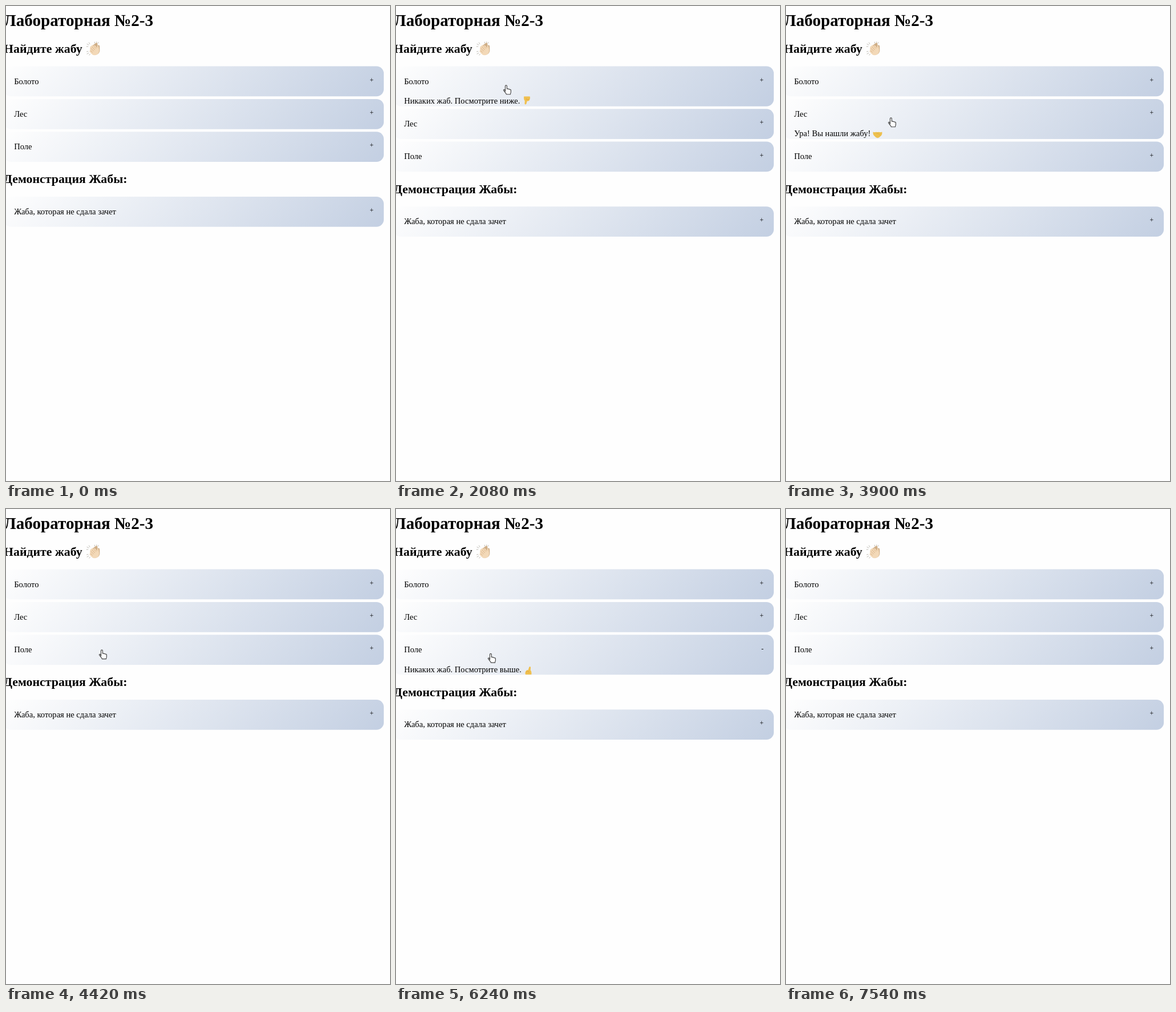
Recreate the animation shown at these times as an HTML page. Size 673 px wide and 832 px high, loop 7.67 s.

```html
<!DOCTYPE html>
<html lang="ru">
<head>
<meta charset="utf-8">
<title>Лабораторная</title>
<style>
  html, body { margin: 0; width: 100%; height: 100%; overflow: hidden; background: #fefefe; }
  #page {
    position: absolute; left: -4.3px; top: 0; width: 732.3px;
    transform: scale(.91); transform-origin: 0 0;
    font: 16px/18px "Liberation Serif", "Times New Roman", serif; color: #000;
    white-space: nowrap;
  }
  h1, h2 { margin: 0; font-weight: bold; }
  h1 { position: absolute; top: 9.4px; font-size: 32px; line-height: 37px; }
  h2 { font-size: 24px; line-height: 27px; }
  .first { position: absolute; top: 68.6px; }
  .second { margin: 19.92px 0; }
  #list { position: absolute; top: 116.3px; width: 100%; }
  .item {
    position: relative; margin-bottom: 5px; border-radius: 14px; overflow: hidden;
    background: linear-gradient(135deg, #fefefe, #c3cfe2);
  }
  .head { padding: 20px; }
  .sign { position: absolute; right: 20px; top: 19px; font-size: 13px; line-height: 15px; }
  .panel { position: relative; height: 0; padding: 0 20px; overflow: hidden; }
  .emoji { position: absolute; overflow: visible; }
  .panel .emoji { width: 19px; height: 19px; margin: 0 0 0 4px; top: 0; }
  .first .emoji { width: 28px; height: 28px; left: 100%; margin-left: 7px; top: -1px; }
  #cursor { position: absolute; left: 0; top: 0; width: 24px; height: 24px; overflow: visible; }
  #cursor path { fill: #fff; stroke: #444; stroke-width: 1.15; stroke-linejoin: round; }
</style>
</head>
<body>
<div id="page">
  <h1>Лабораторная №2-3</h1>
  <h2 class="first">Найдите жабу
    <svg class="emoji" viewBox="0 0 28 28">
      <path d="M12 9 L20 3 Q22 2 22.5 4.5 L23 8 Q26.5 6 26.8 10 L27 18 Q26 25 19 26 Z" fill="#cfae87"/>
      <path d="M9 13 Q7 10.5 9.5 9.5 L11 10 Q10.5 7 13 7 L15.5 9 Q16 6.5 18.5 8.5 L22 13 L21.8 9 Q23.5 7 24.6 10 L26 17 Q26 23 21 26 Q15 28.5 11 24 L7.5 20 Q6.5 17.5 9 17.5 L8 16 Q7 14 9 13 Z" fill="#f3d9b8"/>
      <path d="M9.5 13 L15.5 19 M11.5 10 L17.5 16.4 M15.2 9 L20 14 M9 17.5 L13.2 21.4" fill="none" stroke="#d3aa7c" stroke-width=".9"/>
      <path d="M2 5 L6 7 M6 2 L8 5.5 M1 10 L5 10 M17 1 L17.4 4 M21 .5 L20.6 2.3 M24.5 1.5 L23.6 4 M1.5 20 L5 19.2 M2 24.5 L6 22.2 M6.5 27 L8.5 24.2" fill="none" stroke="#b9b4ad" stroke-width="1"/>
    </svg>
  </h2>
  <div id="list"></div>
</div>
<svg id="cursor" viewBox="0 0 24 24"><path></path></svg>

<script>
const LOOP = 7670, STEP = 130, PANEL = 19;

const emoji = body => `<svg class="emoji" viewBox="0 0 20 20">${body}</svg>`;
const finger = `<path d="M4 20 Q2.5 16 4.5 13 Q6 10 9.5 10.5 L11.3 4.5 Q13.4 2.4 14.6 5 L14.2 11 Q16.8 13 16 20 Z" fill="#f0c050"/>
  <path d="M5 15 Q8 12.5 10.5 13.6 L11.5 16" fill="none" stroke="#d99f36" stroke-width=".8"/>`;
const shake = `<path d="M1 5.5 Q4 7 7 5.8 L10 6.2 L13 5.8 Q16 7 19.5 5.5 Q20 10 18.2 12.5 L13.5 17 Q10.5 18.8 7 17 L2.5 12.5 Q.6 10 1 5.5 Z" fill="#edc04f"/>
  <path d="M8 9 L11 8.5 L16 13" fill="none" stroke="#d9a63c" stroke-width=".7"/>`;
const fingerDown = `<g transform="rotate(180 10 10)">${finger}</g>`;

const rows = [
  ["Болото", "Никаких жаб. Посмотрите ниже." + emoji(fingerDown)],
  ["Лес", "Ура! Вы нашли жабу!" + emoji(shake)],
  ["Поле", "Никаких жаб. Посмотрите выше." + emoji(finger)],
  ["Жаба, которая не сдала зачет", ""]
];
const list = document.getElementById("list");
list.innerHTML = rows.map(([title, text], i) =>
  (i === 3 ? '<h2 class="second">Демонстрация Жабы:</h2>' : "") +
  `<div class="item"><div class="head">${title}</div><span class="sign">+</span><div class="panel">${text}</div></div>`
).join("");
const signs = list.querySelectorAll(".sign");
const panels = list.querySelectorAll(".panel");

// row, opening click, closing click, delay before the panel starts to move
const clicks = [[0, 1300, 2080, 0], [1, 2730, 3900, 130], [2, 4940, 6500, 130]];

// time, x, y of the pointer's centre
const track = [
  [260, 228, 788], [390, 220, 640], [520, 210, 440], [650, 202, 262], [780, 197, 176], [910, 195, 147],
  [2340, 193, 156], [2470, 189, 184], [2600, 186, 204],
  [4160, 183, 214], [4290, 176, 238], [4420, 170, 255], [4550, 168, 261.5],
  [7020, 170, 300], [7150, 174, 400], [7280, 181, 590], [7410, 190, 812], [7540, 0, -99]
];

const cursor = document.getElementById("cursor");
const shape = cursor.firstChild;
const HAND = "M4.5 11.5V2.3a1.45 1.45 0 0 1 2.9 0V7.2c.5-.6 2.2-.5 2.5.5.7-.5 2-.3 2.3.7.8-.4 2.2 0 2.2 1.2v3.2c0 1-.9 2-.9 3.9H6.4c-.2-1.5-1.8-2.6-2.8-4.3L1.6 9.8c-.6-1 .9-1.9 1.8-1.1z";
const ARROW = "M3 1V15.5L6.4 12.4L8.7 17.4L11 16.4L8.8 11.6H13.2Z";

const easeOut = p => 1 - (1 - p) ** 2;
const ramp = (t, from) => easeOut(Math.min(1, Math.max(0, (t - from) / 200)));

function draw(now) {
  const t = Math.floor((now % LOOP) / STEP) * STEP;
  for (const [row, open, close, delay] of clicks) {
    const grow = ramp(t, open + delay - (delay ? 70 : 80));
    const fold = ramp(t, close + 30);
    panels[row].style.height = PANEL * (grow - fold) + "px";
    signs[row].textContent = t >= open && t < close ? "-" : "+";
  }
  const spot = track.filter(k => k[0] <= t).pop() || [0, 0, -99];
  const [, x, y] = spot;
  shape.setAttribute("d", y > 110 && y < 280 ? HAND : ARROW);
  cursor.style.transform = `translate(${x - 8}px, ${y - 9}px)`;
  cursor.style.visibility = y < 0 ? "hidden" : "visible";
}

const start = performance.now();
function tick() {
  draw(performance.now() - start);
  requestAnimationFrame(tick);
}
tick();
</script>
</body>
</html>
```
